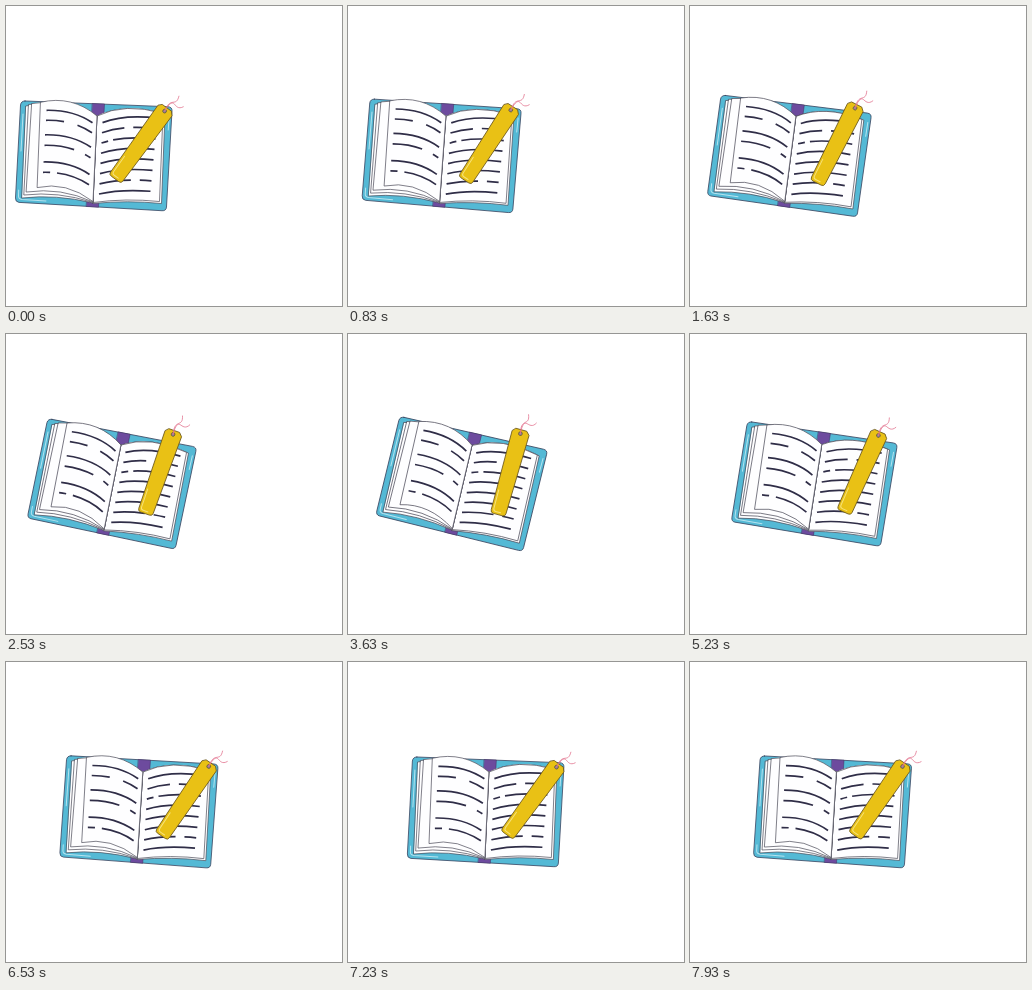
These frames come from a looping animation (336x300 px, 8 s). An HTML page:

```html
<!DOCTYPE html>
<html lang="en">
<head>
<meta charset="utf-8">
<title>Book and bookmark</title>
<style>
  html, body { margin: 0; width: 100%; height: 100%; overflow: hidden; background: #fff; }
  svg { display: block; width: 336px; height: 300px; }
  path { stroke-linejoin: round; stroke-linecap: round; }
  .cover { fill: #54b9d5; stroke: #3a4560; stroke-width: .8; }
  .spine { fill: #6d4b9e; stroke: #40305f; stroke-width: .5; }
  .page { fill: #fefeff; stroke: #4b4a58; stroke-width: .7; }
  .shine { fill: none; stroke: #b5e3ef; stroke-width: 1; }
  .line { fill: none; stroke: #2f2d47; stroke-width: 1.7; stroke-linecap: butt; }
  .mark { fill: #e9c115; stroke: #6e5a1e; stroke-width: .8; }
  .gleam { fill: none; stroke: #f6e27a; stroke-width: 1; }
  .string { fill: none; stroke: #e2708c; stroke-width: .7; }
</style>
</head>
<body>
<svg viewBox="0 0 336 300">
  <g id="book">
    <path class="cover" d="M19 95L162 100.700Q166.200 101 166 105L160.500 201Q160.200 205 156 204.700L13 196.400Q9.300 196 9.500 192L14.500 99Q15 95 19 95Z"/>
    <path class="spine" d="M86.500 97.500L98.500 98L92.500 201.200L80.500 200.500Z"/>
    <path class="shine" d="M17 108L15 145M12.700 184L12.500 190Q12.500 193 16 193.400L40 195M163.200 110L162.200 124"/>
    <path class="page" d="M91 110Q119 96 159 108L155.500 197.500Q122 194 87 197.500Z"/>
    <path class="page" d="M91 110Q119 96 157 107.500L153.500 195.500Q120 192 87 196.500Z"/>
    <path class="page" d="M20 100Q60 92 91 110L87 197Q50 188 16 192Z"/>
    <path class="page" d="M22.800 98.500Q60 92 91 110L87 196.500Q52 185 18.200 189Z"/>
    <path class="page" d="M26 97.500Q62 91 91 110L87 196Q55 181 20.500 186Z"/>
    <path class="page" d="M34.800 96.200Q66 89 91 110L87 195.500Q60 175 31.500 181.500Z"/>
    <g id="lines"></g>
  </g>
  <g id="mark">
    <path class="mark" d="M-5.500 -44L5.500 -44L8.800 -40.500L7.500 41Q7.500 44 4.500 44L-4.800 44Q-7.800 44 -7.800 41L-8.800 -40.500Z"/>
    <path class="gleam" d="M-5.800 20L-5.600 39Q-5.500 41.500 -3 41.500L2 41.500"/>
    <circle cy="-40" r="1.900" fill="#8d8496" stroke="#5c4b2a" stroke-width=".6"/>
    <path class="string" d="M0 -40C-1 -50 1 -52 3.500 -51.500S10 -49 12.600 -54.500M0 -40C-2 -48 -.5 -50 1.500 -52S5 -55 2.800 -60.500"/>
  </g>
</svg>
<script>
const $ = id => document.getElementById(id);
const LOOP = 8000, STEP = 100, PEAK = 3580, SPEED = .0069;

function addLine(d, dash) {
  const p = document.createElementNS('http://www.w3.org/2000/svg', 'path');
  p.setAttribute('class', 'line');
  p.setAttribute('d', d);
  if (dash) p.setAttribute('stroke-dasharray', dash);
  $('lines').append(p);
}

// left page: start x, start y, dashes
[[40.5, 104.3], [40, 114.3, '18 14 40'], [39, 128.8], [38.5, 139.3, '30 12 40'],
 [37.5, 156], [37, 166.3, '7 7 60']].forEach(([x, y, dash]) =>
  addLine(`M${x} ${y}q27 -.5 46 12.500`, dash));

// right page: dashes per row
['', '23 9 60', '7 5 60', '', '', '', '32 9 60', ''].forEach((dash, i) =>
  addLine(`M${96.5 - i * .5} ${116.6 + i * 10.2}q22 ${-8.5 + i * .5} ${55 - i * .5} ${-4.5 + i * .25}`, dash));

function draw(now) {
  const t = Math.max(0, Math.floor((now % LOOP + 70) / STEP) * STEP - 70);
  const x = t * SPEED;
  const swing = Math.cos((t - PEAK) * .000855) + 1;
  $('book').setAttribute('transform', `translate(${x}) rotate(${5.3 * swing} 87.8 153.6)`);
  $('mark').setAttribute('transform',
    `translate(${138 + x} 133.4) rotate(${36.1 - 10.3 * swing}) translate(0 5)`);
  requestAnimationFrame(draw);
}
draw(performance.now());
</script>
</body>
</html>
```
